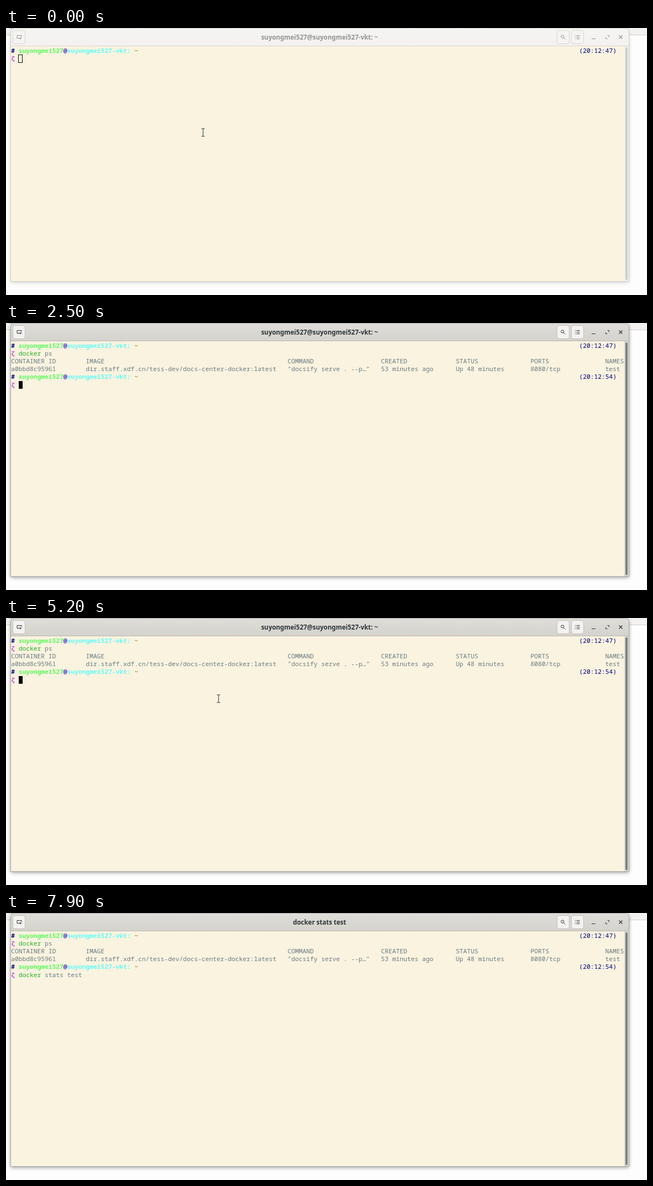
An HTML page that plays this animation: 1158 px wide and 483 px high, repeating every 8000 ms.

```html
<!DOCTYPE html>
<html lang="en">
<head>
<meta charset="utf-8">
<title>Terminal</title>
<style>
  html, body { margin: 0; width: 100%; height: 100%; overflow: hidden; background: #fefdfd; }
  #stage { position: relative; width: 1158px; height: 483px; overflow: hidden; }
  #stage div, #stage svg { position: absolute; }
  #strip { left: 0; top: 0; width: 1158px; height: 12px; background: #f3f2f1; border-bottom: 1px solid #d2d1d0; overflow: hidden; }
  #strip div { top: -13px; font: 11px/20px "Noto Sans", sans-serif; color: #333; white-space: pre; }
  #strip .bar { top: 0; width: 10px; height: 1px; background: #555; }

  #win {
    --f: 0;
    --mix: calc(var(--f) * 100%);
    left: 9px; top: 1px; width: 1116px; height: 457px;
    border-radius: 7px 7px 0 0;
    background: #f9f3e0;
    box-shadow: 0 0 0 1px color-mix(in srgb, #a9a8a5 var(--mix), #cfcecb),
      0 2px 7px rgba(0, 0, 0, calc(.2 + var(--f) * .25));
  }
  #head {
    left: 0; top: 0; width: 1116px; height: 31px;
    border-radius: 7px 7px 0 0;
    border-bottom: 1px solid color-mix(in srgb, #bcb8b1 var(--mix), #dad7d3);
    background: linear-gradient(
      color-mix(in srgb, #dfddd9 var(--mix), #f5f4f2),
      color-mix(in srgb, #d5d3cd var(--mix), #f3f2f0));
  }
  #title {
    left: 0; width: 1115px; top: 0; text-align: center; white-space: pre;
    font: bold 11.48px/31px "Noto Sans", "Open Sans", sans-serif;
    color: color-mix(in srgb, #2e3436 var(--mix), #929595);
  }
  .btn {
    box-sizing: border-box; top: 3px; width: 23px; height: 25px; border-radius: 4px;
    border: 1px solid color-mix(in srgb, #c4bfb9 var(--mix), #d9d6d2);
    background: color-mix(in srgb, #f3f2f0 var(--mix), #f5f4f2);
  }
  #icons { left: 0; top: 0; fill: none; stroke: color-mix(in srgb, #2e3436 var(--mix), #8f9292); }
  #trough { left: 1108px; top: 32px; width: 8px; height: 425px; background: color-mix(in srgb, #d8d6cf var(--mix), #f1efea); }
  #slider { left: 2px; top: 2px; width: 4px; height: 421px; border-radius: 2px; background: color-mix(in srgb, #7f8182 var(--mix), #cfcdca); }
  #slider.hover { background: #55585a; }

  .row, #sel { font: 11.258px/14.1px "Noto Sans Mono", "DejaVu Sans Mono", monospace; white-space: pre; color: #6a7b80; }
  .row b { font-weight: 700; }
  .navy { color: #00007c; }
  .user { color: #5cf95c; }
  .at { color: #4a22c4; }
  .host { color: #62fbf6; }
  .tilde { color: #8b9410; }
  .zeta { color: #cf3fd6; }
  .cmd { color: #24ae24; }
  #sel { background: #000; color: #fff; overflow: hidden; height: 14.1px; }
  #cursor { box-sizing: border-box; width: 6.8px; height: 14.1px; background: #000; }
  #cursor.hollow { width: 8px; height: 15px; margin: -.5px; background: none; border: 1px solid #000; }
  #beam, #arrow { left: 0; top: 0; overflow: visible; }
</style>
</head>
<body>
<div id="stage">
  <div id="strip"></div>
  <div id="win">
    <div id="head">
      <div class="btn" style="left:3px"></div>
      <div class="btn" style="left:986px"></div>
      <div class="btn" style="left:1012px"></div>
      <div id="title"></div>
      <svg id="icons" width="1116" height="31">
        <path d="M16.5 17.5h-5.5v-5h8v3M15 17.500h4M17 15.500v4"/>
        <circle cx="996.300" cy="14.500" r="2.600"/><path d="M998.300 16.500l3 3"/>
        <path d="M1021.500 12.500h6M1021.500 15.500h6M1021.500 18.500h6M1019 12.500h1M1019 15.500h1M1019 18.500h1"/>
        <path d="M1049 18.500h7"/>
        <path d="M1077.500 12.500h3v3M1074.500 15.500v3h3"/>
        <path d="M1098.500 12.500l6 6M1104.500 12.500l-6 6" stroke-width="1.200"/>
      </svg>
    </div>
    <div id="trough"><div id="slider"></div></div>
  </div>
  <div id="rows"></div>
  <div id="sel"> test </div>
  <div id="cursor"></div>
  <svg id="beam" width="1" height="1">
    <g fill="none">
      <path d="M-3-7h2.500l.5.700.5-.7h2.500M0-6.500v13M-3 7h2.500l.5-.7.5.7h2.500" stroke="#fff" stroke-width="2.400" opacity=".75"/>
      <path d="M-3-7h2.500l.5.700.5-.7h2.500M0-6.500v13M-3 7h2.500l.5-.7.5.7h2.500" stroke="#222"/>
    </g>
  </svg>
  <svg id="arrow" width="1" height="1">
    <path d="M0 0v15l3.500-3.200 2.300 5.200 2.400-1-2.300-5h5z" fill="#111" stroke="#fff"/>
  </svg>
</div>
<script>
const LOOP = 8000, X0 = 9.3, Y0 = 34, CW = 6.755, RH = 14.1;
const USER = 'suyongmei527', HOST = 'suyongmei527-vkt';
const $ = id => document.getElementById(id);
const colX = c => X0 + c * CW;
const rowY = r => Y0 + r * RH;

// Bookmark bar: folder bars and the label bottoms peeking above the window
const labels = [
  [5, 'M'], [63, 'Quick notes'], [150, 'Tools'], [204, 'Web dev'], [275, 'Reading list'],
  [362, 'Learning log'], [460, 'Design'], [529, 'Inspiration'], [617, 'Server'], [679, 'Shell'],
  [726, 'Ops'], [768, 'Testing'], [832, 'Docs'], [880, 'Misc'], [927, 'Build tools'], [1022, 'Others']
];
$('strip').innerHTML = labels.map(([x, s], i) =>
  `<div style="left:${x}px">${s}</div>` +
  (i > 1 ? `<div class="bar" style="left:${x - 14}px"></div>` : '')).join('') +
  '<div class="bar" style="left:38px;background:#5aa595"></div>';

// Terminal text
const span = (cls, s) => `<b class="${cls}">${s}</b>`;
const table = cells => {
  const cols = [0, 20, 74, 99, 119, 139, 159];
  return cells.reduce((line, s, i) => line.padEnd(cols[i]) + s, '');
};
const prompt = time => span('navy', '# ') + span('user', USER) + span('at', '@') +
  span('host', HOST + ':') + span('tilde', ' ~') + ' '.repeat(118) + `<span class="navy">(${time})</span>`;
const input = args => span('zeta', 'ζ') + (args ? ` <span class="cmd">docker</span> ${args}` : '');
const header = table(['CONTAINER ID', 'IMAGE', 'COMMAND', 'CREATED', 'STATUS', 'PORTS', 'NAMES']);
const entry = table(['a0bbd8c95961', 'dir.staff.xdf.cn/tess-dev/docs-center-docker:latest',
  '"docsify serve . --p…"', '53 minutes ago', 'Up 48 minutes', '8080/tcp', 'test']);

const rows = Array.from({ length: 6 }, (_, r) => {
  const el = document.createElement('div');
  el.className = 'row';
  el.style.cssText = `left:${X0}px;top:${rowY(r)}px`;
  $('rows').append(el);
  return el;
});
const setHTML = (el, html) => {
  if (el.shown !== html) el.innerHTML = el.shown = html;
};
const show = (el, on) => { el.style.visibility = on ? 'visible' : 'hidden'; };
const at = (keys, t) => keys.findLast(k => k[0] <= t);

// Timelines: time first, then values
const HOME = `${USER}@${HOST}: ~`;
const focus = [[0, 0], [400, .4], [500, .95], [600, .98], [700, 1]];
const titles = [[0, HOME], [2300, 'docker ps'], [2500, HOME], [7300, 'docker stats test']];
const first = [[0, ''], [1200, 'stats test'], [1400, 'ps']];
const second = [[0, ''], [6000, 'ps'], [6400, 'stats test']];
const cursor = [ // column, row; no column means blinked off
  [0, 2, 1], [1200, 19, 1], [1400, 12, 1], [2000], [2300, 0, 2], [2400, 0, 4], [2500, 2, 5],
  [2900], [3500, 2, 5], [4100], [4700, 2, 5], [5300], [5700, 2, 5], [6000, 12, 5],
  [6400, 19, 5], [7000], [7300, 0, 6], [7900]
];
const mouse = [
  [0, 356, 189], [3100, 375, 185], [3500, 1125, 112], [3600, 1125, 112], [3700, 1089, 97],
  [4200, 1078, 84], [4300, 1078, 84], [4600, 1111, 87], [4700, 1111, 87], [5200, 384, 146],
  [5400, 386, 148.5], [LOOP, 386, 148.5]
];
const mouseAt = t => {
  const i = mouse.findLastIndex(k => k[0] <= t);
  const [t0, x0, y0] = mouse[i], [t1, x1, y1] = mouse[i + 1];
  const k = (t - t0) / (t1 - t0);
  return [x0 + (x1 - x0) * k, y0 + (y1 - y0) * k];
};

function draw(t) {
  $('win').style.setProperty('--f', at(focus, t)[1]);
  setHTML($('title'), at(titles, t)[1]);

  setHTML(rows[0], prompt('20:12:47'));
  setHTML(rows[1], input(at(first, t)[1]));
  setHTML(rows[2], t < 2400 ? '' : header);
  setHTML(rows[3], t < 2400 ? '' : entry);
  setHTML(rows[4], t < 2500 ? '' : prompt('20:12:54'));
  setHTML(rows[5], t < 2500 ? '' : input(at(second, t)[1]));

  const [, col, row] = at(cursor, t);
  const caret = $('cursor');
  show(caret, col !== undefined);
  caret.className = t < 400 ? 'hollow' : '';
  if (col !== undefined) {
    caret.style.left = colX(col) + 'px';
    caret.style.top = rowY(row) + 'px';
  }

  // The pointer hides while typing
  const seen = t < 1000 || (t >= 3100 && t < 5700);
  const [x, y] = t < 1000 ? [356, 189] : mouseAt(t);
  const outside = x >= 1118;
  show($('beam'), seen && !outside);
  show($('arrow'), seen && outside);
  $('beam').style.transform = $('arrow').style.transform = `translate(${x}px, ${y}px)`;
  $('slider').className = seen && outside ? 'hover' : '';

  const selecting = t >= 4400 && t < 5200;
  const cells = t >= 4600 ? 6 : Math.floor((x - X0) / CW) - 157;
  show($('sel'), selecting);
  $('sel').style.cssText += `;left:${colX(158)}px;top:${rowY(3)}px;width:${Math.max(0, cells) * CW}px`;
}

const start = performance.now();
function tick() {
  const t = (performance.now() - start) % LOOP;
  draw(Math.floor(t / 100) * 100);
  requestAnimationFrame(tick);
}
tick();
</script>
</body>
</html>
```
